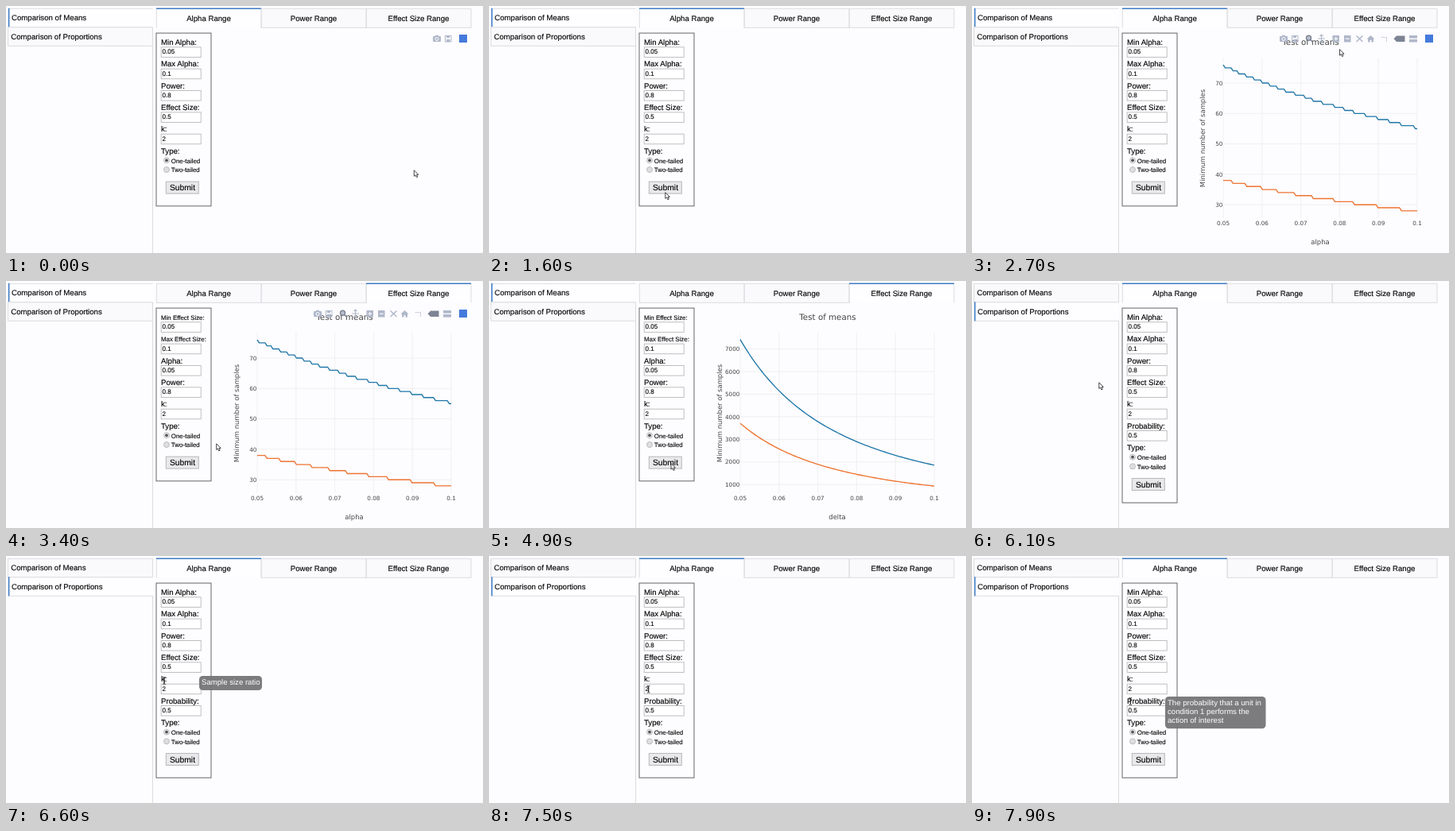
These frames come from a looping animation (600x311 px, 8 s). An HTML page:

```html
<!DOCTYPE html>
<html lang="en">
<head>
<meta charset="utf-8">
<title>Sample size calculator</title>
<style>
  html, body { margin: 0; width: 100%; height: 100%; overflow: hidden; background: #fdfcfe; }
  svg { display: block; width: 600px; height: 311px; }
  text {
    font-family: "Liberation Sans", Arial, sans-serif; fill: #000;
    stroke: #000; stroke-width: .12px; text-rendering: geometricPrecision;
  }
  .plot text { font-family: "DejaVu Sans", Verdana, sans-serif; fill: #444; stroke: none; }
  .mid { text-anchor: middle; }
  .end { text-anchor: end; }
  .tip text { fill: #fff; stroke: none; }
</style>
</head>
<body>
<svg id="stage" viewBox="0 0 600 311"></svg>
<script>
const LOOP = 8000, BLUE = '#3f7bc4', LINE = '#dcdce0', ICON = '#b0b8ca', DARK_ICON = '#7d8494';
const SMALL = 7.9, BODY = 9.65;

const text = (x, y, s, size = BODY, attrs = '') =>
  `<text x="${x}" y="${y}" font-size="${size}" ${attrs}>${s}</text>`;
const rect = (x, y, w, h, fill, attrs = '') =>
  `<rect x="${x}" y="${y}" width="${w}" height="${h}" fill="${fill}" ${attrs}/>`;
const path = (d, stroke, width = 1, attrs = '') =>
  `<path d="${d}" fill="none" stroke="${stroke}" stroke-width="${width}" ${attrs}/>`;
const group = (id, body, cls = '') => `<g id="${id}" class="${cls}">${body}</g>`;

// Page parts

function menu(active) {
  const items = ['Comparison of Means', 'Comparison of Proportions'];
  return items.map((label, i) => {
    const on = i === active, y = 3 + i * 23.5;
    return rect(2.5, y, 182, 23.5, on ? '#fefdff' : '#faf9fb') +
      path(`M2.5 ${y + .3}H184.5M2.5 ${y + 23.8}H184.5`, LINE) +
      (on ? rect(2.8, y - .2, 1.6, 24, BLUE) : path(`M2.5 ${y}v24M184.5 ${y}v24`, LINE)) +
      text(on ? 7 : 6.3, y + 15.2, label);
  }).join('') + path('M184.5 50V311', LINE);
}

function tabs(active) {
  return ['Alpha Range', 'Power Range', 'Effect Size Range'].map((label, i) => {
    const on = i === active, x = 189 + i * 132;
    return rect(x, 3, 132, 24.5, on ? '#fefdff' : '#faf9fb') +
      path(`M${x + .3} 3V27.5M${x + 132} 3V27.5`, LINE) +
      (on ? rect(x, 2.5, 132, 1.5, BLUE) : path(`M${x} 3.3h132M${x} 27.3h132`, LINE)) +
      text(x + 66, 18.6, label, BODY, 'class="mid"');
  }).join('');
}

function form(fields) {
  const pitch = 27.35, base = fields.length * pitch;
  const inputs = fields.map(([label, value], i) => {
    const y = 48.9 + i * pitch;
    return text(195, y, label + ':', label.length > 12 ? SMALL : BODY) +
      rect(195.2, y + 2.9, 50, 12.6, '#fff', 'stroke="#b8b8bc" stroke-width=".9"') +
      text(196.6, y + 11.5, value, 8);
  }).join('');
  const radios = ['One-tailed', 'Two-tailed'].map((label, i) => {
    const y = base + 57.6 + i * 11.7;
    return `<circle cx="202" cy="${y}" r="3.5" fill="${i ? '#dedee0' : '#e9e9eb'}" stroke="#b0b0b4" stroke-width=".8"/>` +
      (i ? '' : `<circle cx="202" cy="${y}" r="1.9" fill="#555"/>`) +
      text(207.8, y + 3.2, label, SMALL);
  }).join('');
  return rect(189, 34.1, 69, base + 81, 'none', 'stroke="#66666a"') + inputs +
    text(195, base + 48.9, 'Type:') + radios +
    rect(201.3, base + 84.4, 41, 15, '#e9e9eb', 'stroke="#b8b8bc"') +
    text(222, base + 95.6, 'Submit', 10.3, 'class="mid"');
}

// Statistics behind the curves

function upperZ(p) {
  const t = Math.sqrt(-2 * Math.log(p));
  return t - (2.515517 + t * (.802853 + t * .010328)) /
    (1 + t * (1.432788 + t * (.189269 + t * .001308)));
}
function samples(alpha, delta, ratio) {
  const z = upperZ(alpha);
  return Math.ceil(1.5 * ratio * ((z + upperZ(.2)) / delta) ** 2 + .2 * ratio * z * z);
}

function chart(id, name, ticks, yOf, count) {
  const xOf = v => 316 + (v - .05) * 4880;
  const xs = [.05, .06, .07, .08, .09, .1];
  const curve = (ratio, color) => path('M' + Array.from({ length: 100 }, (_, i) => {
    const v = .05 + .05 * i / 99;
    return xOf(v).toFixed(2) + ' ' + yOf(count(v, ratio)).toFixed(2);
  }).join('L'), color, 1.35, 'stroke-linejoin="round"');
  return group(id,
    xs.map(v => path(`M${xOf(v)} 65V267`, '#ececef', .8)).join('') +
    ticks.map(v => path(`M316 ${yOf(v)}H560`, '#ececef', .8)).join('') +
    curve(2, '#1f77a9') + curve(1, '#ee7430') +
    xs.map(v => text(xOf(v), 276.2, v, 7.25, 'class="mid"')).join('') +
    ticks.map(v => text(315.4, yOf(v) + 2.6, v, 7.25, 'class="end"')).join('') +
    text(426, 48.5, 'Test of means', 10.3, 'class="mid"') +
    text(438, 299.7, name, 8.45, 'class="mid"') +
    text(0, 0, 'Minimum number of samples', 8.45, 'class="mid" transform="translate(293 166.5) rotate(-90)"'),
    'plot');
}

// Chart toolbar

const camera = x => rect(x - 5, 38, 10, 7, ICON, 'rx="1"') + rect(x - 2, 36.8, 4, 2, ICON) +
  `<circle cx="${x}" cy="41.5" r="2" fill="${ICON}" stroke="#fff"/>`;
const disk = x => rect(x - 3.5, 37.5, 7.5, 7.5, 'none', `stroke="${ICON}"`) +
  rect(x - 2, 37.5, 4, 2.5, ICON) + rect(x - 2, 42, 4.5, 3, ICON);
const mark = rect(570, 36, 10, 10, '#447adb');
const toolbar = camera(392) + disk(406) +
  `<circle cx="423.5" cy="40.3" r="3" fill="#b9bfcc" stroke="${DARK_ICON}" stroke-width="1.4"/>` +
  path('M425.7 42.5l3 3', DARK_ICON, 1.6) +
  path('M435 41h9M439.5 36.5v9M437.5 38l2-2 2 2M437.5 44l2 2 2-2', ICON, 1.1) +
  rect(453.5, 37, 8.5, 8.5, ICON) + path('M455.5 41.2h4.6M457.8 39v4.6', '#fff', 1.1) +
  rect(468, 37, 8.5, 8.5, ICON) + path('M470 41.2h4.6', '#fff', 1.1) +
  path('M483.5 37.5l8 7.5M491.5 37.5l-8 7.5', ICON, 1.5) +
  `<path d="M496.5 41.5l5-4.5 5 4.5h-1.5v4h-2.5v-2.5h-2v2.5h-2.5v-4z" fill="${ICON}"/>` +
  path('M515 39.5h6.5v6', ICON, 1, 'stroke-dasharray="1.5 1"') +
  `<path d="M530.5 41.2l3.5-3.7h10.5v7.4h-10.5z" fill="${DARK_ICON}"/>` +
  rect(550, 37, 10, 3.6, ICON) + rect(550, 42, 10, 3.6, ICON) + mark;

function tooltip(id, y, width, lines) {
  return group(id, rect(243, y, width, 7 + 11.1 * lines.length, '#757578', 'rx="4.5" fill-opacity=".95"') +
    lines.map((s, i) => text(246, y + 11.2 + i * 11.1, s, 9.6)).join(''), 'tip');
}

const alphaForm = [['Min Alpha', .05], ['Max Alpha', .1], ['Power', .8], ['Effect Size', .5], ['k', 2]];
const sizeForm = [['Min Effect Size', .05], ['Max Effect Size', .1], ['Alpha', .05], ['Power', .8], ['k', 2]];

document.getElementById('stage').innerHTML =
  group('means', menu(0) + tabs(0) + form(alphaForm)) +
  group('sizes', menu(0) + tabs(2) + form(sizeForm)) +
  group('props', menu(1) + tabs(0) + form([...alphaForm, ['Probability', .5]])) +
  chart('alphaPlot', 'alpha', [30, 40, 50, 60, 70], v => 250.2 - (v - 30) * 3.83,
    (v, ratio) => samples(v, .5, ratio)) +
  chart('deltaPlot', 'delta', [1, 2, 3, 4, 5, 6, 7].map(n => n * 1000), v => 256.2 - (v - 1000) * .02842,
    (v, ratio) => samples(.05, v, ratio)) +
  group('shortBar', camera(542) + disk(556) + mark) +
  group('fullBar', toolbar) +
  tooltip('ratioTip', 151, 79, ['Sample size ratio']) +
  tooltip('probTip', 177, 126.5, ['The probability that a unit in', 'condition 1 performs the', 'action of interest']) +
  group('arrow', '<path d="M0 0v7.6l1.7-1.5 1.3 2.9 1.5-.7-1.3-2.7h2.3z" fill="#fff" stroke="#333" stroke-width=".9"/>') +
  group('beam', path('M-1.7-4.5q1.7 0 1.7 1v7q0 1-1.7 1M1.7-4.5q-1.7 0-1.7 1v7q0 1 1.7 1', '#222', .9));

// Motion: time, x, y

const route = [
  [0, 513.7, 206.7], [700, 221.8, 234.8], [2200, 221.8, 234.8], [2800, 510, 19], [3000, 510, 19],
  [3400, 264.8, 204.8], [3800, 229, 229.5], [5000, 229, 229.5], [5400, 110, 42], [5800, 110, 42],
  [6100, 159.7, 127.8], [6600, 199, 157], [7200, 199, 157], [7500, 200.7, 167.7], [7700, 199.3, 183]
];
function pointer(t) {
  const i = route.findIndex(k => k[0] > t);
  if (i < 0) return route[route.length - 1].slice(1);
  const [t0, x0, y0] = route[i - 1], [t1, x1, y1] = route[i], u = (t - t0) / (t1 - t0);
  return [x0 + (x1 - x0) * u, y0 + (y1 - y0) * u];
}

const el = id => document.getElementById(id);
const show = (id, opacity) => {
  el(id).style.opacity = Math.max(0, Math.min(1, opacity));
};

function draw(now) {
  const t = now % LOOP, within = (a, b) => t >= a && t < b ? 1 : 0;
  show('means', within(0, 2900));
  show('sizes', within(2900, 5600));
  show('props', within(5600, LOOP));
  show('alphaPlot', within(1700, 4800));
  show('deltaPlot', within(4800, 5600));
  show('shortBar', (700 - t) / 250);
  show('fullBar', Math.min((t - 2400) / 150, (3680 - t) / 250));
  show('ratioTip', within(6600, 7250));
  show('probTip', within(7700, 7900) * .6 + within(7900, LOOP));
  show('arrow', within(0, 6500));
  show('beam', within(6500, LOOP));
  const place = `translate(${pointer(t).join(' ')})`;
  el('arrow').setAttribute('transform', place);
  el('beam').setAttribute('transform', place);
}

const start = performance.now();
function tick() {
  draw(Math.max(0, performance.now() - start));
  requestAnimationFrame(tick);
}
tick();
</script>
</body>
</html>
```
